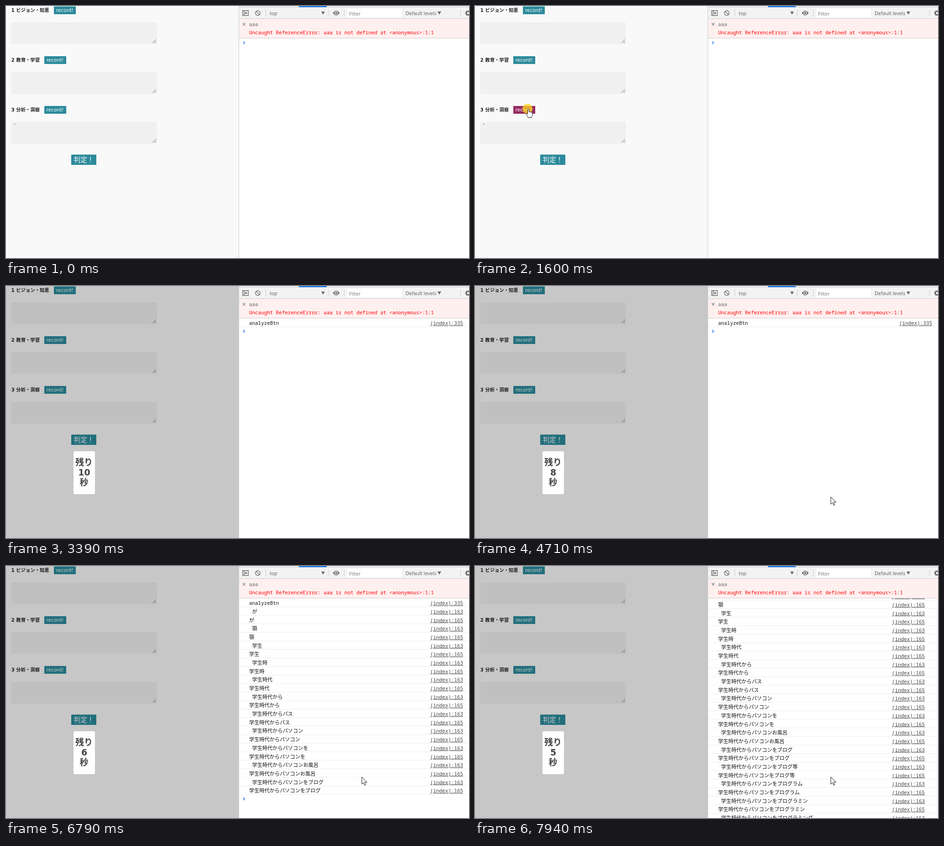
Animation of 1015x552 px, one loop 8 s. Source, as an HTML page:

```html
<!DOCTYPE html>
<html lang="ja">
<head>
<meta charset="utf-8">
<style>
html, body { margin: 0; width: 100%; height: 100%; overflow: hidden; background: #fff }
svg { display: block }
text { white-space: pre }
.head { font: bold 10.35px "DejaVu Sans", "Noto Sans CJK JP", sans-serif; fill: #222 }
.btn { font: 10.5px "DejaVu Sans", "Noto Sans CJK JP", sans-serif; fill: #fff }
.big { font: bold 19px "DejaVu Sans", "Noto Sans CJK JP", sans-serif; fill: #444; text-anchor: middle }
.bar { font: 10.8px "Open Sans", sans-serif; fill: #5a5a5a }
.mono { font: 10.9px "Noto Sans Mono", monospace }
.ja { font: 11.2px "Noto Sans CJK JP", sans-serif }
.link { fill: #444; text-anchor: end; text-decoration: underline }
</style>
</head>
<body>
<svg width="1015" height="552" viewBox="0 0 1015 552">
  <clipPath id="listClip"><rect x="511" y="71" width="504" height="481"/></clipPath>
  <rect width="510" height="552" fill="#f9f9f9"/>
  <g id="form"></g>
  <rect x="143" y="325.5" width="55" height="22.5" fill="#2b8a9b"/>
  <text class="btn" x="148.5" y="341.5" style="font-size:14.7px">判定！</text>
  <text class="mono" id="tick" x="15.5" y="268" style="font-size:12px" fill="#333">`</text>
  <g id="modal">
    <rect width="510" height="552" opacity=".2"/>
    <rect x="148" y="362" width="47" height="94" rx="3" fill="#fff"/>
    <text class="big" x="171" y="393">残り</text>
    <text class="big" x="171.5" y="415" id="count"></text>
    <text class="big" x="171" y="436.5">秒</text>
  </g>

  <rect x="511" width="504" height="27" fill="#f3f3f3"/>
  <path d="M511 2.5H1015M511 27.5H1015M510.5 0V552" stroke="#ccc"/>
  <rect x="642" width="61" height="2.5" fill="#1a73e8"/>
  <path d="M569.5 8V22M706.5 8V22M741.5 8V22M996.5 8V22" stroke="#ccc"/>
  <g fill="none" stroke="#6e6e6e" stroke-width="1.4">
    <path d="M518.7 10.2H531.3V20.8H518.7ZM522 10V21"/>
    <circle cx="552" cy="15.5" r="5.2"/><path d="M548.4 11.9L555.6 19.1"/>
    <circle cx="1013" cy="15.5" r="4" stroke-width="3"/>
    <path d="M1006.5 15.5H1010M1008.5 11L1011 13M1008.5 20L1011 18" stroke-width="2.2"/>
  </g>
  <path d="M524.5 12.5L529.5 15.5L524.5 18.5ZM691 12H699L695 19ZM946 12H954L950 19Z" fill="#6e6e6e"/>
  <path d="M716.5 15.5Q724 5.5 731.5 15.5Q724 25.5 716.5 15.5Z" fill="#6e6e6e"/>
  <circle cx="724" cy="15.5" r="3.6" fill="#f3f3f3"/><circle cx="724" cy="15.5" r="2.2" fill="#6e6e6e"/>
  <rect x="748" y="6" width="120" height="19" fill="#fff"/>
  <text class="bar" x="578" y="19.5">top</text>
  <text class="bar" x="752" y="20.5" style="fill:#757575">Filter</text>
  <text class="bar" x="876" y="19.5">Default levels</text>

  <rect x="511" y="28" width="504" height="42" fill="#fff0f0"/>
  <path d="M511 70.5H1015" stroke="#d2cccc"/>
  <path d="M519 37L525 43M525 37L519 43" stroke="#888" stroke-width="1.3"/>
  <text class="mono" x="533" y="44" fill="#666">aaa</text>
  <text class="mono" x="533" y="62" fill="#f00">Uncaught ReferenceError: aaa is not defined at &lt;anonymous&gt;:1:1</text>
  <g clip-path="url(#listClip)">
    <g id="list">
      <path id="prompt" d="M520 -3L523.3 0L520 3" fill="none" stroke="#367cf1" stroke-width="1.6"/>
    </g>
  </g>
  <path id="edge" d="M1014.5 71V552" stroke="#e4e4e4"/>

  <circle id="click" cx="115" cy="225" r="11" fill="#ffd61e" opacity=".75"/>
  <path id="arrow" d="M0 0V16L3.7 12.6L6.2 18.3L8.8 17.1L6.3 11.5H11.2Z" fill="#fff" stroke="#111"/>
  <path id="hand" d="M-1.5 12V1.5Q0 -.5 1.5 1.5V7Q3 5.5 4.5 7.5Q6 6.2 7 8Q9 7.2 9 9.5V14Q8.5 16 7 17.5V19.5H-1V17.5L-5.5 11.5Q-5 9.2-3 10.5Z" fill="#fff" stroke="#111"/>
</svg>
<script>
const $ = id => document.getElementById(id);
const show = (el, on) => el.style.display = on ? '' : 'none';
const PITCH = 18.68, STEP = 77;

// Form: label, button x, top of the section
$('form').innerHTML = [['1 ビジョン・知恵', 105, 1], ['2 教育・学習', 84, 110], ['3 分析・洞察', 84, 219]].map(([label, x, y]) => `
  <text class="head" x="11.5" y="${y + 11.5}">${label}</text>
  <rect id="rec${label[0]}" x="${x}" y="${y}" width="48" height="17" fill="#2b8a9b"/>
  <text class="btn" x="${x + 4.7}" y="${y + 11.7}">record!</text>
  <rect x="11.5" y="${y + 35}" width="319.5" height="47.5" rx="2" fill="#f0f0f0"/>
  <path d="M321.5 ${y + 80}L329 ${y + 72.5}M326 ${y + 80}L329 ${y + 77}" stroke="#666"/>`).join('');

// Console: each recognised phrase is logged twice
const stem = '学生時代から', pc = stem + 'パソコン';
const phrases = [
  [5030, 'が'], [5260, '顎'], [5330, '学生'], [5560, '学生時'], [5640, '学生時代'], [5870, stem],
  [6250, stem + 'パス'], [6330, pc], [6410, pc + 'を'], [6640, pc + 'お風呂'], [6790, pc + 'をブログ'],
  [7020, pc + 'をブログ等'], [7100, pc + 'をプログラム'], [7790, pc + 'をプログラミン'], [7940, pc + 'をプログラミング']
];
const logs = [{ time: 1760, text: 'analyzeBtn', line: 335, x: 533, font: 'mono' }];
for (const [time, text] of phrases)
  logs.push({ time, text, line: 163, x: 539.5, font: 'ja' }, { time, text, line: 165, x: 533, font: 'ja' });
logs.forEach((log, i) => {
  log.el = document.createElementNS('http://www.w3.org/2000/svg', 'g');
  log.el.setAttribute('transform', `translate(0 ${i * PITCH})`);
  log.el.innerHTML = `<text class="${log.font}" x="${log.x}" y="85.3" fill="#111">${log.text}</text>
    <text class="mono link" y="85.3">(index):${log.line}</text>
    <path d="M511 89.5H1015" stroke="#ededed"/>`;
  log.link = log.el.querySelector('.link');
  $('list').append(log.el);
});

const tracks = [
  { end: 1920, keys: [[360, 149, 432], [670, 105, 345], [900, 78, 270], [1050, 102, 242], [1130, 111, 236], [1210, 112, 231], [1280, 117, 225]] },
  { end: 2150, keys: [[1920, 250, 275], [1997, 520, 350], [2070, 776, 425]] },
  { end: 8000, keys: [[4100, 945, 374], [4330, 880, 465], [4480, 830, 494], [4700, 780, 462]] }
];
function pointerAt(t) {
  const track = tracks.find(({ keys, end }) => t >= keys[0][0] && t < end);
  if (!track) return null;
  const { keys } = track, start = keys[0][0];
  const q = start + Math.floor((t - start) / STEP + .1) * STEP;
  const i = keys.findIndex(k => k[0] > q);
  if (i < 0) return keys.at(-1).slice(1);
  if (i === 0) return keys[0].slice(1);
  const [t0, x0, y0] = keys[i - 1], [t1, x1, y1] = keys[i], p = (q - t0) / (t1 - t0);
  return [x0 + (x1 - x0) * p, y0 + (y1 - y0) * p];
}

function place(el, on, x, y) {
  show(el, on);
  if (on) el.setAttribute('transform', `translate(${x} ${y})`);
}

function draw(t) {
  const open = t >= 1760;
  show($('modal'), open);
  show($('tick'), !open);
  show($('click'), t >= 1600 && !open);
  $('count').textContent = 10 - [3700, 4710, 5720, 6720, 7710].filter(s => t >= s).length;

  const count = logs.filter(l => t >= l.time).length;
  const scroll = Math.max(0, 71 - (31 - count) * PITCH);
  logs.forEach((log, i) => {
    show(log.el, i < count);
    log.link.setAttribute('x', scroll ? 986 : 1002);
  });
  $('list').setAttribute('transform', `translate(0 ${-scroll})`);
  $('prompt').setAttribute('transform', `translate(0 ${80.5 + count * PITCH})`);
  show($('edge'), scroll > 0);

  const [x, y] = pointerAt(t) || [-99, -99];
  const hover = !open && x > 84 && x < 132 && y >= 219 && y <= 237;
  const inField = !open && y > 253 && y < 301;
  $('rec3').setAttribute('fill', hover || open && t < 3390 ? '#962a63' : '#2b8a9b');
  place($('hand'), hover, x, y);
  place($('arrow'), x > 0 && !hover && !inField, x - (open && t < 1920 ? 1.2 : 0), y);
}

(function frame() {
  draw(performance.now() % 8000);
  requestAnimationFrame(frame);
})();
</script>
</body>
</html>
```
